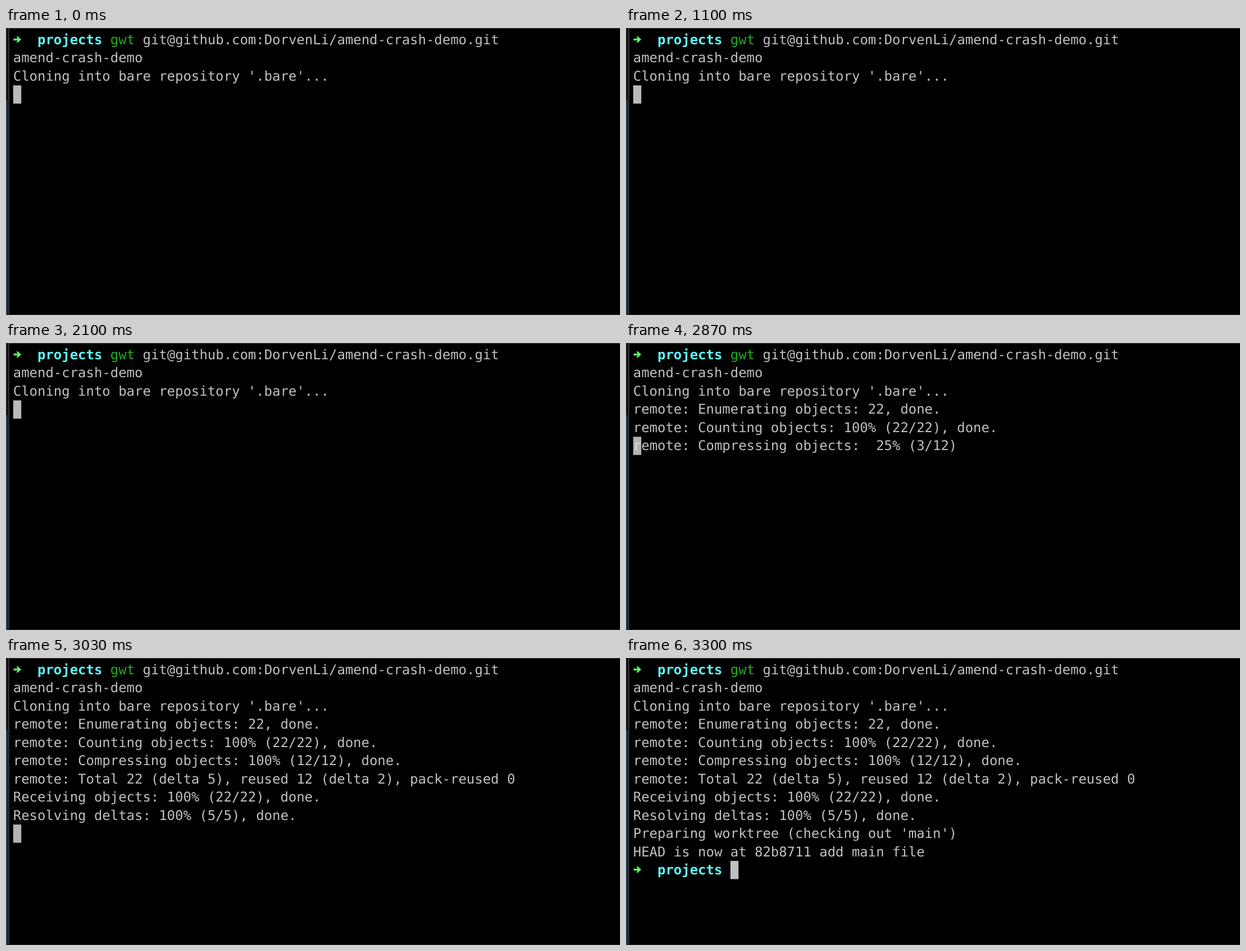
Write an HTML page that moves like this. It is 1093 px wide and 512 px high and loops after 3810 ms.

```html
<!DOCTYPE html>
<html lang="en">
<head>
<meta charset="utf-8">
<title>Terminal clone</title>
<style>
  html, body { margin: 0; width: 100%; height: 100%; overflow: hidden; background: #000; }
  svg { display: block; width: 1093px; height: 512px; }
  text {
    font: 23.95px "DejaVu Sans Mono", monospace;
    fill: #c1c1c1;
    white-space: pre;
    text-rendering: geometricPrecision;
  }
  .dir { fill: #60fbfd; font-weight: bold; }
  .cmd { fill: #1fb01c; }
  .arrow { fill: #5af95f; }
</style>
</head>
<body>
<svg id="stage" viewBox="0 0 1093 512">
  <rect width="1093" height="512"/>
  <rect width="3" height="129" fill="#17191c"/>
  <rect y="129" width="3" height="383" fill="#253c56"/>
  <rect x="4" width="1.5" height="512" fill="#4b4b4b"/>
  <rect x="4" width="1089" height="1" fill="#454545"/>
  <rect x="4" y="510.5" width="1089" height="1.5" fill="#1d1d1d"/>
  <rect id="cursor" width="14.4" height="32.5" fill="#bababa"/>
</svg>
<script>
const LOOP = 3810, LEFT = 12.8, TOP = 5, COL = 14.42, ROW = 32.45, BASE = 24;
const stage = document.getElementById('stage');
const cursor = document.getElementById('cursor');

function add(parent, tag, attrs, content) {
  const el = document.createElementNS('http://www.w3.org/2000/svg', tag);
  for (const key in attrs) el.setAttribute(key, attrs[key]);
  if (content) el.textContent = content;
  return parent.appendChild(el);
}

function write(parent, row, col, content, cls = '') {
  return add(parent, 'text', {
    x: LEFT + col * COL, y: TOP + row * ROW + BASE, class: cls
  }, content);
}

function prompt(row) {
  const g = add(stage, 'g', {});
  add(g, 'path', {
    class: 'arrow',
    transform: `translate(13.5 ${TOP + row * ROW + 15.5})`,
    d: 'M0-1.8H7L5.2-5.6H7.6L13.6 0L7.6 5.6H5.2L7 1.8H0Z'
  });
  write(g, row, 3, 'projects', 'dir');
  return g;
}

const first = prompt(0);
write(first, 0, 12, 'gwt', 'cmd');
write(first, 0, 16, 'git@github.com:DorvenLi/amend-crash-demo.git');

const rows = [first];
[
  'amend-crash-demo',
  "Cloning into bare repository '.bare'...",
  'remote: Enumerating objects: 22, done.',
  'remote: Counting objects: 100% (22/22), done.',
  'remote: Compressing objects: 100% (12/12), done.',
  'remote: Total 22 (delta 5), reused 12 (delta 2), pack-reused 0',
  'Receiving objects: 100% (22/22), done.',
  'Resolving deltas: 100% (5/5), done.',
  "Preparing worktree (checking out 'main')",
  'HEAD is now at 82b8711 add main file'
].forEach((line, i) => rows.push(write(stage, i + 1, 0, line)));
rows.push(prompt(11));

const partial = add(stage, 'g', {});
write(partial, 5, 0, 'r').style.fill = '#dedede';
write(partial, 5, 1, 'emote: Compressing objects:  25% (3/12)');

// start time, finished rows, cursor row, cursor column, cursor colour
const steps = [
  [0, 3, 3, 0, '#bababa'],
  [2870, 5, 5, 0, '#b3b3b3'],
  [2900, 6, 6, 0, '#b3b3b3'],
  [3030, 9, 9, 0, '#b3b3b3'],
  [3130, 10, 10, 0, '#b6b6b6'],
  [3200, 11, 11, 0, '#b8b8b8'],
  [3270, 12, 11, 12, '#bfbfbf']
];

function draw(time) {
  const now = time % LOOP;
  const [, shown, row, col, colour] = steps.filter(step => step[0] <= now).pop();
  rows.forEach((el, i) => { el.style.display = i < shown ? '' : 'none'; });
  partial.style.display = shown === 5 ? '' : 'none';
  cursor.setAttribute('x', LEFT + col * COL);
  cursor.setAttribute('y', TOP + row * ROW);
  cursor.setAttribute('fill', colour);
}

const start = performance.now();
function tick() {
  draw(performance.now() - start);
  requestAnimationFrame(tick);
}
tick();
</script>
</body>
</html>
```
